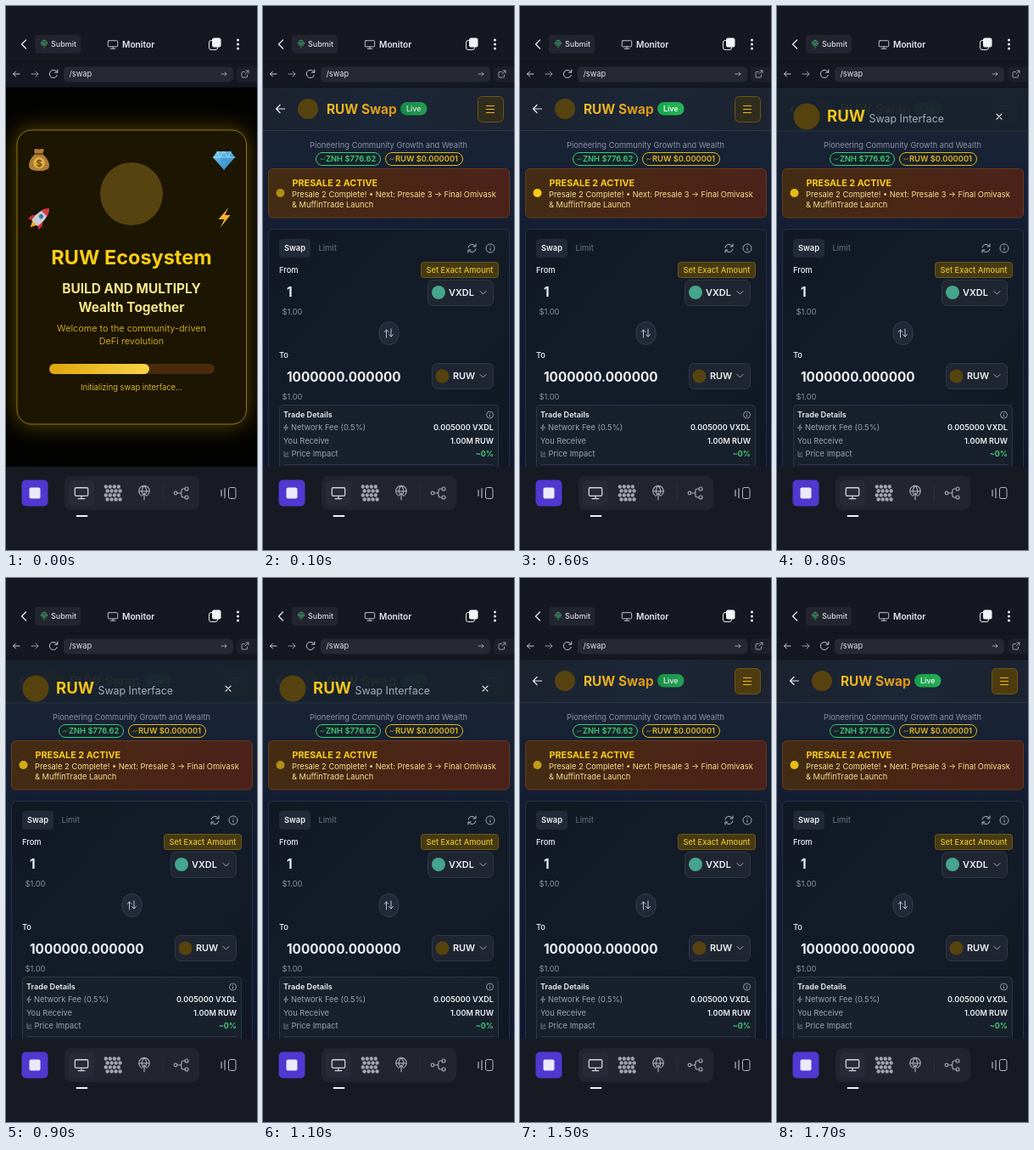
These frames come from a looping animation (296x640 px, 1800 ms). An HTML page:

```html
<!DOCTYPE html>
<html lang="en">
<head>
<meta charset="utf-8">
<title>Swap app</title>
<style>
  html, body { margin: 0; width: 100%; height: 100%; overflow: hidden; background: #161821; }
  svg { display: block; width: 296px; height: 640px; font-family: Inter, sans-serif; font-optical-sizing: none; }
</style>
</head>
<body>
<svg id="stage" viewBox="0 0 296 640"></svg>
<script>
const GOLD = '#facc15', WHITE = '#eef0f4', GRAY = '#8b93a3';

const rect = (x, y, w, h, r, fill, stroke = 'none', more = '') =>
  `<rect x="${x}" y="${y}" width="${w}" height="${h}" rx="${r}" fill="${fill}" stroke="${stroke}" ${more}/>`;
const disc = (x, y, r, fill, more = '') => `<circle cx="${x}" cy="${y}" r="${r}" fill="${fill}" ${more}/>`;
const ring = (x, y, r, color, w = 1) => disc(x, y, r, 'none', `stroke="${color}" stroke-width="${w}"`);
const shape = (d, fill) => `<path d="${d}" fill="${fill}"/>`;
const line = (d, color = '#c9ccd6', w = 1) =>
  `<path d="${d}" fill="none" stroke="${color}" stroke-width="${w}" stroke-linecap="round" stroke-linejoin="round"/>`;
const text = (x, y, size, weight, fill, s, anchor = 'start') =>
  `<text x="${x}" y="${y}" font-size="${size}" font-weight="${weight}" fill="${fill}" text-anchor="${anchor}">${s}</text>`;
const group = (content, attrs) => `<g ${attrs}>${content}</g>`;
const at = (x, y, content, scale = 1) => group(content, `transform="translate(${x} ${y}) scale(${scale})"`);
const gradient = (id, vector, ...colors) => `<linearGradient id="${id}" ${vector}>` +
  colors.map((c, i) => `<stop offset="${i / (colors.length - 1)}" stop-color="${c}"/>`).join('') + '</linearGradient>';

const coin = (x, y, r) => disc(x, y, r, '#57430f');
const reload = (x, y, color) => at(x, y, line('M4.3 1.5A4.6 4.6 0 1 1 3.4 -3.1L4.6 -2M4.8 -5V-1.8H1.6', color));
const refresh = (x, y, color) => at(x, y, line('M-4.5 -1A4.6 4.6 0 0 1 4 -2.3M4.5 -5V-2H1.5M4.5 1A4.6 4.6 0 0 1 -4 2.3M-4.5 5V2H-1.5', color));
const info = (x, y, r, color) => at(x, y, ring(0, 0, r, color, .9) + line(`M0 0V${r * .45}M0 ${-r * .45}v.1`, color));
const monitor = (x, y, s, color) =>
  at(x, y, line('M-5 -4.5H5Q6 -4.5 6 -3.5V2Q6 3 5 3H-5Q-6 3 -6 2V-3.5Q-6 -4.5 -5 -4.5ZM0 3V5.5M-3 5.5H3', color), s);
const globe = (x, y, s, color) =>
  at(x, y, line('M-3.5 2.5A5 5 0 1 1 3.5 2.5M-5 -1H5M-1.8 1Q-3 -3 0 -6Q3 -3 1.8 1M0 7V1M-2.5 3.5L0 1L2.5 3.5', color), s);

const defs = `<defs>
  ${gradient('page', 'x2="0" y2="1"', '#1b2536', '#121c32', '#0f1830')}
  ${gradient('panel', 'x2="1" y2="1"', '#111823', '#131c29', '#101722')}
  ${gradient('header', 'x2="1"', '#1c222e', '#1b2738', '#1d2330')}
  ${gradient('title', 'x2="1"', '#f2bd25', '#dc930f')}
  ${gradient('live', 'x2="1"', '#17a34a', '#28b45a')}
  ${gradient('banner', 'x2="1"', '#432c14', '#4a2615', '#4b221a')}
  ${gradient('bar', 'x2="1"', '#dfa50c', '#f8d549')}
  ${gradient('gem', 'x2="1" y2="1"', '#7fd0f0', '#1f78ba')}
  <filter id="glow" x="-30%" y="-30%" width="160%" height="160%"><feGaussianBlur stdDeviation="12"/></filter>
</defs>`;

const moneyBag = at(39, 181,
  shape('M-5 -7L-6 -12Q-2 -14 0 -12Q3 -14 6 -12L4 -7Q12 0 12 7Q12 13 0 13Q-12 13 -12 7Q-12 0 -5 -7Z', '#b07c3c') +
  line('M-4 -7H4', '#6b4420', 2) + disc(0, 3.5, 6.8, '#e0ae3c') + text(0, 7.5, 11, 700, '#6b4410', '$', 'middle'));
const diamond = at(257, 181,
  shape('M-8 -10H8L13 -3L0 12L-13 -3Z', 'url(#gem)') + shape('M-5 -3H5L0 12Z', '#3d9fd4') +
  line('M-13 -3H13M-8 -10L-5 -3L0 -10L5 -3L8 -10', '#a9def2', .8));
const rocket = group(
  shape('M-4 8L0 16L4 8Z', '#f8a51b') + shape('M-5 0L-9 5V11L-4 8ZM5 0L9 5V11L4 8Z', '#cf2a3a') +
  shape('M0 -15Q8 -6 5 9H-5Q-8 -6 0 -15Z', '#c9ccd6') + shape('M0 -15Q4 -12 5 -7H-5Q-4 -12 0 -15Z', '#d93646') +
  disc(0, -2, 2.6, '#39789f'), 'transform="translate(40 249) rotate(45)"');
const bolt = at(257.5, 249, shape('M5 -12L-7 2H0L-5 12L7 -3H0.5Z', '#fbb22c'));

const splash = rect(0, 96, 296, 446, 0, '#030302') +
  group(rect(11, 144, 274, 350, 19, '#a17d00'), 'filter="url(#glow)" opacity=".5"') +
  rect(13, 146, 270.5, 346, 17, '#1b1502', '#94780f') +
  moneyBag + diamond + rocket + bolt + coin(148, 221, 37) +
  text(148, 304, 23.5, 700, GOLD, 'RUW Ecosystem', 'middle') +
  text(148, 338, 15.4, 700, '#f7e58a', 'BUILD AND MULTIPLY', 'middle') +
  text(148, 360, 15.4, 700, '#f7e58a', 'Wealth Together', 'middle') +
  text(148, 383, 10.8, 400, '#cca51e', 'Welcome to the community-driven', 'middle') +
  text(148, 398, 10.8, 400, '#cca51e', 'DeFi revolution', 'middle') +
  rect(51, 421, 195, 12, 6, '#4a2a0b') + rect(51, 421, 118, 12, 6, 'url(#bar)') +
  text(148, 452, 9.35, 400, '#d9b32a', 'Initializing swap interface...', 'middle');

const pricePill = (x, w, color, label) => rect(x + .5, 172.5, w, 15, 7.5, '#18222c', color) +
  line(`M${x + 5.5} 181l1.5 -1.5l1.5 1.5l2 -2`, color, .7) + text(x + 12, 183.4, 9.3, 600, color, label);

const tokenButton = (x, y, icon, label, labelX) => rect(x + .5, y + .5, 271 - x, 30, 6, '#1f2631', '#303846') +
  icon + text(labelX, y + 19, 10.9, 600, WHITE, label) + line(`M256 ${y + 13.5}l3.5 3.5l3.5 -3.5`, '#a4abb8');

const amount = (y, label, value) => text(19, y, 9.3, 500, WHITE, label) +
  text(28, y + 28, 15.3, 700, WHITE, value) + text(22.5, y + 49, 9.3, 400, GRAY, '$1.00');

const detail = (y, x, label, value, color) => text(x, y, 9.3, 400, '#9aa3b2', label) +
  text(272, y, 9.1, 600, color, value, 'end');

const page = rect(0, 96, 296, 446, 0, 'url(#page)') +
  text(148, 166.5, 9.28, 400, GRAY, 'Pioneering Community Growth and Wealth', 'middle') +
  pricePill(62, 76, '#3ecb74', 'ZNH $776.62') + pricePill(144, 91, '#e5b51a', 'RUW $0.000001') +
  rect(6.5, 191.5, 284, 57.5, 5, 'url(#banner)', '#693a1b') +
  disc(20.5, 220, 5, GOLD, 'id="dot"') +
  text(34.5, 212, 10.8, 700, GOLD, 'PRESALE 2 ACTIVE') +
  text(34, 225, 9.3, 400, '#f6df8b', 'Presale 2 Complete! • Next: Presale 3 → Final Omivask') +
  text(34, 237, 9.3, 400, '#f6df8b', '&amp; MuffinTrade Launch') +
  rect(6.5, 262.5, 284, 300, 6, 'url(#panel)', '#263144') +
  rect(19, 274, 37, 22, 4, '#222a37') + text(37.5, 288.3, 9.3, 600, WHITE, 'Swap', 'middle') +
  text(65.5, 288.3, 9.3, 500, '#5f6878', 'Limit') +
  refresh(246.5, 285, '#b0b7c3') + info(268, 285, 5, '#b0b7c3') +
  amount(313.5, 'From', '1') +
  rect(186.5, 301.5, 91, 18, 3, '#463a15', '#6c5719') + text(232, 314, 9.3, 500, '#e6c02a', 'Set Exact Amount', 'middle') +
  tokenButton(194, 322, disc(207, 337, 8, '#45a58d'), 'VXDL', 219) +
  rect(137, 371.5, 23, 27, 11.5, '#202937', '#343e4d') +
  line('M145.5 390V381M143 383.5l2.5 -2.5l2.5 2.5M151 380V389M148.5 386.5l2.5 2.5l2.5 -2.5', '#c0c7d2') +
  amount(413.5, 'To', '1000000.000000') +
  tokenButton(199, 420, coin(211.5, 435.5, 8), 'RUW', 224) +
  rect(19.5, 469.5, 258, 90, 4, '#18202c', '#2b3646') +
  text(24, 484, 9.1, 600, WHITE, 'Trade Details') + info(267.5, 481, 4, '#9aa3b2') +
  line('M27.5 492.5l-3 4h2.5l-.5 3l3 -4h-2.5z', '#9aa3b2', .7) +
  detail(499.3, 33, 'Network Fee (0.5%)', '0.005000 VXDL', WHITE) +
  detail(514.8, 24, 'You Receive', '1.00M RUW', WHITE) +
  line('M25 524V530H30M27 528V526M29 528V525', '#9aa3b2', .7) +
  detail(530.3, 33.5, 'Price Impact', '~0%', '#4ade80') +
  line('M25 539.5H272', '#2b3646') +
  rect(0, 96, 296, 50, 0, 'url(#header)') + line('M0 146.5H296', '#2b384b') +
  line('M25.5 121H15.5M20 116.5L15.5 121L20 125.5', WHITE, 1.2) + coin(53, 121, 12) +
  text(75, 127, 15.4, 700, 'url(#title)', 'RUW Swap') +
  group(rect(162, 113, 31.5, 15.5, 7.7, 'url(#live)') + text(177.8, 124, 8.8, 600, '#f0fff4', 'Live', 'middle'), 'id="badge"') +
  rect(253.5, 106.5, 30, 30, 5, '#302d1e', '#6c5719', 'id="menuButton"') +
  line('M263.5 117.5H272.5M263.5 121.5H272.5M263.5 125.5H272.5', '#eab914', 1.2) +
  group(rect(0, 96, 296, 51, 0, '#19222e', 'none', 'opacity=".95"') + line('M0 147H296', '#263345') +
    coin(35, 130, 15.5) + text(59, 136, 18.6, 700, '#f5c518', 'RUW') +
    text(108.5, 136.5, 12.4, 400, '#a5adba', 'Swap Interface') +
    line('M259 127.2l6 6M265 127.2l-6 6', WHITE, 1.2), 'id="menu"');

// Staggered cluster of dots
let dots = '';
for (let row = 0; row < 4; row++)
  for (let col = 0; col < 4; col++)
    dots += disc(117.8 + col * 5 + row % 2 * 1.8, 565.5 + row * 5, 2.2, '#a3a5b0');

const topBar = rect(0, 0, 296, 96, 0, '#161821') + line('M0 65H296M0 95.5H296', '#0e1017') +
  line('M23.5 40L18.5 45L23.5 50', '#e2e4ea', 1.4) +
  rect(34, 34, 54, 22, 4, '#22242f') + globe(45, 44.5, .7, '#45b56b') +
  text(53, 48.3, 9, 500, '#d5d8e0', 'Submit') +
  monitor(126, 45, .95, '#c9ccd6') + text(137, 48.8, 10.2, 600, '#e6e8ee', 'Monitor') +
  rect(239.5, 40.5, 10, 11, 2.5, '#161821', '#eceef2') + rect(243, 37.5, 10.5, 11, 2.5, '#f2f3f6') +
  [40, 45, 50].map(y => disc(273.5, y, 1.5, '#eceef2')).join('') +
  line('M16 80H8.5M11.5 77L8.5 80L11.5 83') + line('M30 80H38M35 77L38 80L35 83', '#9497a3') + reload(56, 80, '#c9ccd6') +
  rect(68, 71.5, 200, 18, 5, '#262833') + text(74.5, 83.4, 9.3, 400, '#dfe1e8', '/swap') +
  line('M254 80H260M258 78L260 80L258 82', '#a9acb8', .9) +
  rect(272, 71.5, 30, 18, 5, '#1d1f29') +
  line('M281.5 77.5H279Q278 77.5 278 78.5V83Q278 84 279 84H283.5Q284.5 84 284.5 83V81M283 76H286V79M286 76L282 80', '#a9acb8', .9);

const bottomBar = rect(0, 542, 296, 98, 0, '#171923') +
  rect(18.5, 557.5, 31, 31, 5, '#5138d0') + rect(27.5, 566.5, 13, 13, 2, '#ece9fc') +
  rect(69, 553, 159, 40, 8, '#22242f') + rect(74, 558, 30, 30, 5, '#282a36') +
  monitor(89, 572.5, 1.28, '#d4d6de') + dots + globe(163, 572, 1.25, '#a3a5b0') +
  line('M185.5 564V582', '#2b2d39') +
  line('M201.5 573H205Q207 573 207 571V570Q207 568 209 568H211M205 573Q207 573 207 575V576Q207 578 209 578H211', '#a3a5b0', 1.2) +
  ring(200, 573, 1.8, '#a3a5b0', 1.2) + ring(213, 568, 2, '#a3a5b0', 1.2) + ring(213, 578, 2, '#a3a5b0', 1.2) +
  rect(262.5, 566.5, 8.5, 13, 2, 'none', '#b5b8c2') + line('M258 567.5V578.5M254 569.5V576.5', '#b5b8c2', 1.2) +
  line('M83.5 600H95.5', '#f0f1f5', 1.8);

const $ = id => document.getElementById(id);
$('stage').innerHTML = defs + group(splash, 'id="splash"') + group(page, 'id="swapPage"') + topBar + bottomBar;

const LOOP = 1800, STEP = 100, MENU_OPEN = 800, MENU_CLOSE = 1300;
const show = (id, on) => $(id).setAttribute('visibility', on ? 'inherit' : 'hidden');

function draw(now) {
  const t = Math.floor(now % LOOP / STEP) * STEP;
  const pulse = (1 + Math.cos(2 * Math.PI * (t - 600) / 1300)) / 2;
  show('splash', t < STEP);
  show('swapPage', t >= STEP);
  show('menu', t >= MENU_OPEN && t < MENU_CLOSE);
  $('dot').setAttribute('opacity', .55 + .45 * pulse);
  $('badge').setAttribute('opacity', .8 + .2 * pulse);
  $('menuButton').setAttribute('fill', t >= MENU_CLOSE ? '#4e3c10' : '#302d1e');
  requestAnimationFrame(() => draw(performance.now() - start));
}
const start = performance.now();
draw(0);
</script>
</body>
</html>
```
